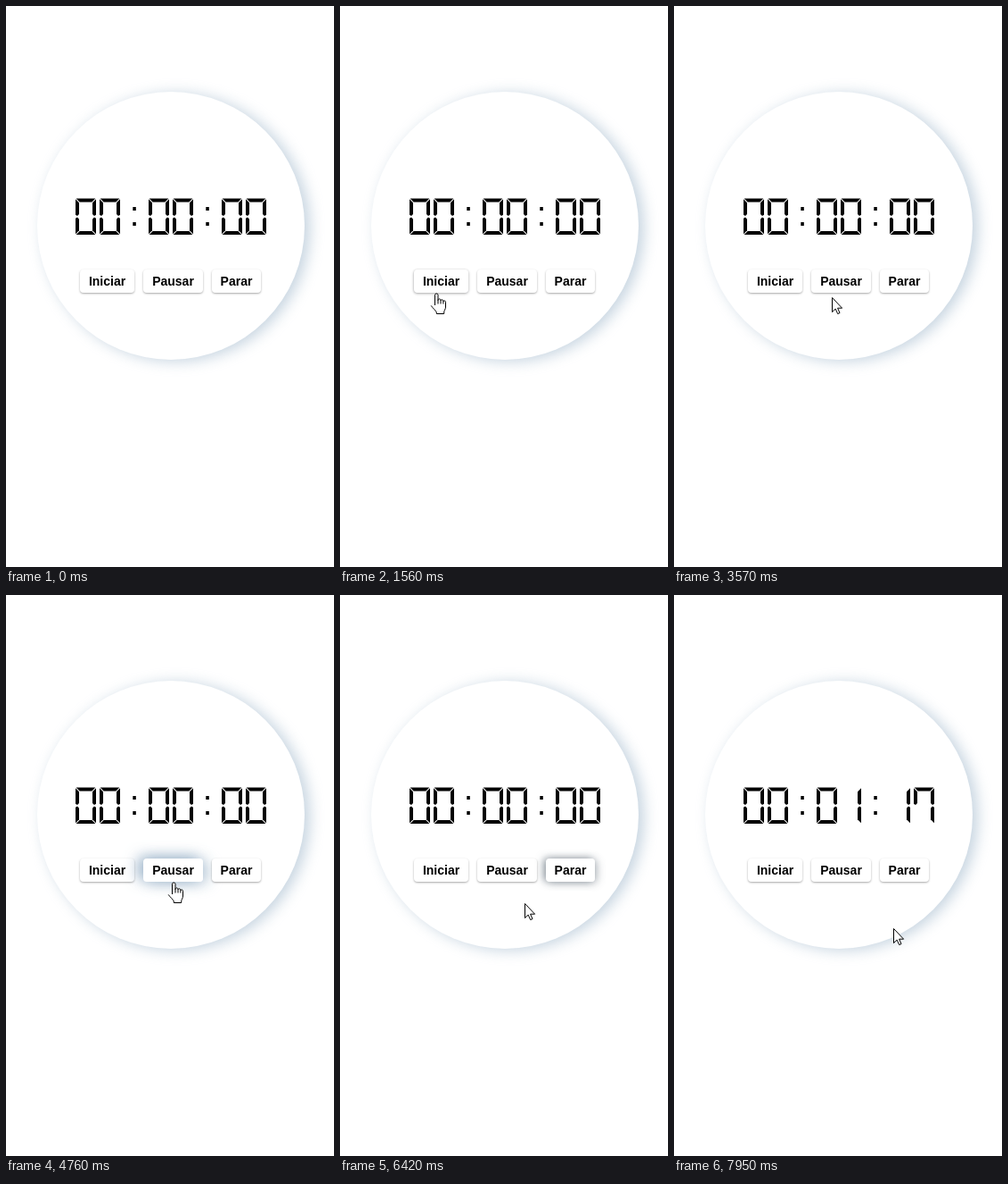
An HTML page with a canvas that plays this animation: 368x628 px, repeating every 8 s.

```html
<!DOCTYPE html>
<html lang="es">
<head>
<meta charset="utf-8">
<title>Cronómetro</title>
<style>
  html, body { margin: 0; width: 100%; height: 100%; overflow: hidden; background: #fff; }
  canvas { display: block; }
</style>
</head>
<body>
<canvas id="stage" width="368" height="628"></canvas>
<script>
const ctx = document.getElementById('stage').getContext('2d');
const LOOP = 8000, START = 500, STEP = 66.53, CLICK = 7180, FADE = 400;

const buttons = [
  { label: 'Iniciar', x: 83, w: 61 },
  { label: 'Pausar', x: 154, w: 67 },
  { label: 'Parar', x: 231, w: 55 }
];
const TOP = 295, BOTTOM = 321;

// Each move eases the pointer to a new resting place, dipping by `sag` on the way.
const origin = { x: -7, y: 498 };
const moves = [
  { from: 250, to: 1694, x: 110, y: 317, sag: 0 },
  { from: 2640, to: 3825, x: 187, y: 321, sag: 13 },
  { from: 4760, to: 5560, x: 250, y: 317, sag: 18 },
  { from: 6150, to: 6900, x: 105, y: 308, sag: 38 },
  { from: 7350, to: 8050, x: 254, y: 377, sag: 0 }
];

const arrow = new Path2D('M.5 .5V16.6L4.2 13.1 6.7 18.6 9 17.6 6.6 12.2H11.6Z');
const hand = new Path2D(
  'M5.5 14V2.3a1.8 1.8 0 0 1 3.5 0V8.4c0-2 3-2 3 0V9c0-1.8 2.9-1.6 2.9.3v.7' +
  'c0-1.6 2.6-1.4 2.6.3V16c0 2.5-1.8 4-1.8 6v1.5H7.3V22C6.8 20 2.8 17 1.2 14' +
  '.4 12.4 2 11 3.4 12.2Z');
const fingers = new Path2D('M9 8V12.5M12 9V12.5M14.9 10V12.5');

const clamp = v => Math.max(0, Math.min(1, v));
const smooth = v => v * v * (3 - 2 * v);
const mix = (a, b, k) => a + (b - a) * k;

// Shadows as [r, g, b, alpha, dx, dy, blur]
const soft = [136, 165, 191, 0.48, 6, 2, 16];
const resting = [[0, 0, 0, 0.12, 0, 1, 3], [0, 0, 0, 0.24, 0, 1, 2]];
const lifted = [soft, [136, 165, 191, 0.8, -6, -2, 16]];

function shadowed(draw, [r, g, b, alpha, dx, dy, blur]) {
  ctx.save();
  ctx.shadowColor = `rgba(${r},${g},${b},${alpha})`;
  ctx.shadowOffsetX = dx;
  ctx.shadowOffsetY = dy;
  ctx.shadowBlur = blur;
  ctx.fillStyle = '#fff';
  ctx.beginPath();
  draw();
  ctx.fill();
  ctx.restore();
}

function pointerAt(t) {
  let p = origin;
  for (const m of moves) {
    const k = smooth(clamp((t - m.from) / (m.to - m.from)));
    p = { x: mix(p.x, m.x, k), y: mix(p.y, m.y, k) + m.sag * Math.sin(Math.PI * k) };
  }
  return p;
}

function isOver(button, t) {
  const { x, y } = pointerAt(t);
  return x >= button.x && x <= button.x + button.w && y >= TOP && y <= BOTTOM + 0.2;
}

// Share of the last FADE ms that the pointer spent on the button.
function hoverAmount(button, t) {
  const samples = 20;
  let hits = 0;
  for (let i = 0; i < samples; i++) hits += isOver(button, t - i * FADE / samples);
  return hits / samples;
}

function drawButton(button, t) {
  const lit = hoverAmount(button, t);
  const box = () => ctx.roundRect(button.x, TOP, button.w, BOTTOM - TOP, 4);
  resting.forEach((shadow, i) =>
    shadowed(box, shadow.map((v, j) => mix(v, lifted[i][j], lit))));
  ctx.fillStyle = '#000';
  ctx.fillText(button.label, button.x + button.w / 2, 313);
}

// Seven-segment digits, built around their centre from three mirrored bars.
const W = 11.5, H = 20.2, T = 4, GAP = 0.7;
const bar = [[GAP - W, -H], [W - GAP, -H], [W - T - GAP, T - H], [T + GAP - W, T - H]];
const side = [[-W, GAP - H], [T - W, T + GAP - H], [T - W, -T / 2 - GAP],
  [T / 2 - W, -GAP], [-W, -T / 2]];
const middle = [[T / 2 + GAP - W, 0], [T + GAP - W, -T / 2], [W - T - GAP, -T / 2],
  [W - T / 2 - GAP, 0], [W - T - GAP, T / 2], [T + GAP - W, T / 2]];
const segments = {
  a: [bar, 1, 1], d: [bar, 1, -1], g: [middle, 1, 1],
  f: [side, 1, 1], b: [side, -1, 1], e: [side, 1, -1], c: [side, -1, -1]
};
const digits = ['abcdef', 'bc', 'abged', 'abgcd', 'fgbc', 'afgcd', 'afgedc', 'fabc', 'abcdefg', 'abcdfg'];

function drawDigit(value, x, y) {
  for (const name of digits[value]) {
    const [shape, flipX, flipY] = segments[name];
    ctx.beginPath();
    shape.forEach(([px, py]) => ctx.lineTo(x + px * flipX, y + py * flipY));
    ctx.fill();
  }
}

function drawClock(ticks) {
  const parts = [Math.floor(ticks / 3600), Math.floor(ticks / 60) % 60, ticks % 60];
  ctx.fillStyle = '#000';
  parts.forEach((n, i) => {
    const x = 89.5 + i * 82;
    drawDigit(Math.floor(n / 10), x, 235.7);
    drawDigit(n % 10, x + 27, 235.7);
    if (i < 2) for (const y of [225, 242]) ctx.fillRect(x + 52.8, y, 3.5, 4);
  });
}

function drawPointer(t) {
  const { x, y } = pointerAt(t);
  const over = buttons.some(b => isOver(b, t));
  const shape = over ? hand : arrow;
  ctx.save();
  ctx.translate(Math.round(x) - (over ? 6 : 0), Math.round(y));
  ctx.fillStyle = '#fff';
  ctx.strokeStyle = '#000';
  ctx.fill(shape);
  ctx.stroke(shape);
  if (over) ctx.stroke(fingers);
  ctx.restore();
}

function render(now) {
  const step = Math.floor((now % LOOP - START + 8) / STEP);
  const t = START + step * STEP;
  ctx.fillStyle = '#fff';
  ctx.fillRect(0, 0, 368, 628);
  shadowed(() => ctx.arc(185, 246, 150, 0, Math.PI * 2), soft);
  drawClock(Math.max(0, Math.round((t - CLICK) / 10)));
  ctx.font = 'bold 14px "Liberation Sans", Arial, sans-serif';
  ctx.textAlign = 'center';
  buttons.forEach(b => drawButton(b, t));
  if (step >= 0) drawPointer(t);
}

const begin = performance.now();
function tick() {
  render(performance.now() - begin);
  requestAnimationFrame(tick);
}
tick();
</script>
</body>
</html>
```
